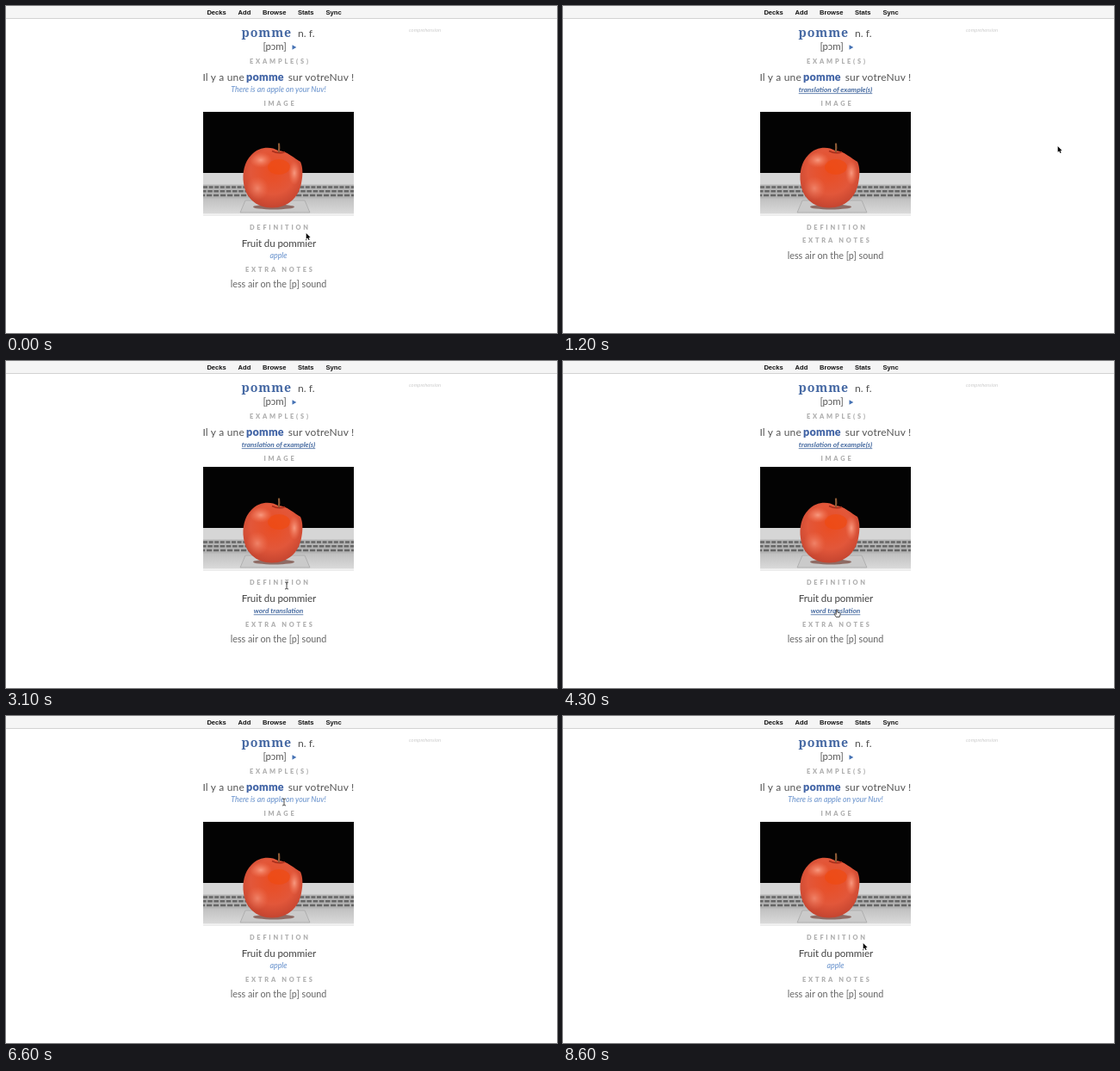
An HTML page for the animation above (8.7 s loop, 640 px wide and 380 px high).

```html
<!DOCTYPE html>
<html lang="fr">
<head>
<meta charset="utf-8">
<title>Vocabulary card</title>
<style>
html, body { margin: 0; width: 100%; height: 100%; overflow: hidden; background: #fff; }
svg { display: block; width: 640px; height: 380px; }
text { font-family: Lato, "Noto Sans", sans-serif; fill: #555; white-space: pre; }
.menu text { font: bold 7.6px "Liberation Sans", sans-serif; fill: #111; text-anchor: middle; }
.head { font-size: 7.4px; font-weight: 900; letter-spacing: 2.8px; fill: #b0b0b0; text-anchor: middle; }
.word { font: bold 14.2px "Noto Serif", serif; letter-spacing: 0.9px; fill: #4568a3; }
.line { font-size: 12px; letter-spacing: 0.2px; }
.line .key { font-size: 12.6px; font-weight: 900; fill: #4063a5; }
.small { font-size: 8.8px; font-weight: 500; font-style: italic; text-anchor: middle; fill: #6f97cf; }
.link { font-size: 8.3px; font-weight: 700; fill: #43689f; text-decoration: underline; text-decoration-thickness: 0.7px; }
.tag { font-size: 5.9px; font-style: italic; fill: #ccc; }
</style>
</head>
<body>
<svg viewBox="0 0 640 380">
  <defs>
    <radialGradient id="skin" cx="0.5" cy="0.4" r="0.62">
      <stop offset="0" stop-color="#ea4d22"/>
      <stop offset="0.6" stop-color="#e2573a"/>
      <stop offset="1" stop-color="#c2432f"/>
    </radialGradient>
    <radialGradient id="shine">
      <stop offset="0" stop-color="#fba58c" stop-opacity="0.85"/>
      <stop offset="1" stop-color="#f58062" stop-opacity="0"/>
    </radialGradient>
    <linearGradient id="metal" x2="0" y2="1">
      <stop offset="0" stop-color="#c0c0c0"/>
      <stop offset="1" stop-color="#dedede"/>
    </linearGradient>
    <clipPath id="frame"><path d="M229 123H404V244H229z"/></clipPath>
  </defs>

  <path d="M0 0h640v14H0z" fill="#f5f5f5"/>
  <path d="M0 14.5h640" stroke="#d2d2d2"/>
  <g class="menu">
    <text x="244.6" y="9.6">Decks</text>
    <text x="277" y="9.6">Add</text>
    <text x="311.7" y="9.6">Browse</text>
    <text x="348.2" y="9.6">Stats</text>
    <text x="380.6" y="9.6">Sync</text>
  </g>

  <text class="word" x="273.6" y="35.5">pomme</text>
  <text x="339" y="35.8" font-size="12.2">n. f.</text>
  <text x="298.4" y="50.6" font-size="11.4">[pɔm]</text>
  <path d="M332.5 45.2l4.8 2.8-4.8 2.8z" fill="#4572b4"/>
  <text class="tag" x="468" y="30">comprehension</text>
  <text class="head" x="318.4" y="67">EXAMPLE(S)</text>

  <g id="back">
    <g class="line">
      <text x="228.4" y="87">Il y a une</text>
      <text class="key" x="279" y="87">pomme</text>
      <text x="327.7" y="87">sur votre</text>
      <text x="375.5" y="87">Nuv !</text>
    </g>
    <text class="small link" id="exLink" x="316.5" y="100.3">translation of example(s)</text>
    <text class="small" id="exText" x="316.5" y="100.3">There is an apple on your Nuv!</text>
    <text class="head" x="318.4" y="115.6">IMAGE</text>

    <g clip-path="url(#frame)">
      <path d="M229 123H404V244H229z" fill="#030303"/>
      <path d="M229 194H404V244H229z" fill="#d6d6d6"/>
      <path d="M229 207.5H404V224H229z" fill="#b4b4b4"/>
      <g fill="none" stroke="#666" stroke-width="2.6">
        <path d="M229 210.5H404" stroke-dasharray="5 1.6"/>
        <path d="M227 215.3H404" stroke-dasharray="5.6 1.6"/>
        <path d="M225 220H404" stroke-dasharray="6.2 1.8"/>
      </g>
      <path d="M229 223.5H404V244H229z" fill="url(#metal)"/>
      <path d="M278 226h69l6 14h-81z" fill="#cacaca" stroke="#a4a4a4" stroke-width="0.7"/>
      <path d="M229 242.5H404" stroke="#f2f2f2" stroke-width="2.6"/>
      <ellipse cx="311" cy="233.5" rx="24" ry="3" fill="#75443a" opacity="0.7"/>
      <path d="M316 168C308 163 294 163 285 173C277 181 274 194 276 206C278 222 290 234.5 309 234.5C328 234.5 340 222 343 206C345 197 345 187 342 181C336 178 326 168 316 168Z" fill="url(#skin)"/>
      <ellipse cx="317" cy="187" rx="13" ry="9" fill="#f04a10" opacity="0.65"/>
      <ellipse cx="296" cy="179" rx="13" ry="9" fill="url(#shine)"/>
      <ellipse cx="335" cy="194" rx="7" ry="14" fill="url(#shine)"/>
      <ellipse cx="292" cy="212" rx="13" ry="14" fill="url(#shine)" opacity="0.65"/>
      <path d="M309 168.5q8 4 15 1" fill="none" stroke="#a52d1b" stroke-width="1.4"/>
      <path d="M316.8 170q.8-5 .2-10.5" fill="none" stroke="#8b5a36" stroke-width="2.2"/>
    </g>

    <text class="head" x="318.4" y="260">DEFINITION</text>
    <g id="def">
      <text x="273.8" y="279.6" font-size="11.6" letter-spacing="-0.1" style="fill:#444">Fruit du pommier</text>
      <text class="small link" id="wordLink" x="316.5" y="293.4">word translation</text>
      <text class="small" id="wordText" x="316.5" y="293.4">apple</text>
    </g>
    <g id="notes">
      <text class="head" x="318.4" y="308.5">EXTRA NOTES</text>
      <text x="316.5" y="327" font-size="10.8" text-anchor="middle" style="fill:#666">less air on the [p] sound</text>
    </g>
  </g>

  <g id="cursor">
    <path id="arrow" d="M-.3 0V6.8L1.4 5.4L2.5 7.9L3.6 7.4L2.6 5H4.6Z" fill="#000" stroke="#fff" stroke-width="0.6" paint-order="stroke"/>
    <path id="beam" d="M-2-4Q0-4 0-3Q0-4 2-4M0-3V3M-2 4Q0 4 0 3Q0 4 2 4" fill="none" stroke="#333" stroke-width="0.9"/>
    <path id="hand" d="M-.7 0Q0-.8.7 0V3L3.6 3.8Q4.4 4.2 4 5.6L3.2 8.5H-.8L-3 5Q-2.6 4-.7 5.4Z" fill="#fff" stroke="#111" stroke-width="0.7"/>
  </g>
</svg>
<script>
const LOOP = 8700, STEP = 100;
const $ = id => document.getElementById(id);

// time, x, y, pointer shape
const path = [
  [0, 349, 264, "arrow"],
  [100, 585, 161, "arrow"],
  [400, 585, 161, "arrow"],
  [500, 576, 163, "arrow"],
  [900, 575, 163, "arrow"],
  [1800, 575, 163, "arrow"],
  [2700, 421, 264, "arrow"],
  [3000, 330, 261, "beam"],
  [3100, 326, 261, "beam"],
  [3700, 326, 263, "beam"],
  [4300, 318, 289, "hand"],
  [4800, 318, 289, "hand"],
  [5000, 345, 282, "beam"],
  [5200, 368, 273, "beam"],
  [5300, 368, 273, "beam"],
  [5400, 380, 269, "beam"],
  [5600, 440, 200, "arrow"],
  [5900, 331, 97, "hand"],
  [6200, 325, 98, "beam"],
  [6600, 323, 100, "beam"],
  [6700, 323, 102, "arrow"],
  [7100, 338, 228, "arrow"],
  [7600, 349, 264, "arrow"],
  [LOOP, 349, 264, "arrow"]
];

const show = (id, on) => { $(id).style.display = on ? "" : "none"; };

function pointer(t) {
  let i = path.length - 2;
  while (path[i][0] > t) i--;
  const [t0, x0, y0, shape] = path[i], [t1, x1, y1] = path[i + 1];
  const k = (t - t0) / (t1 - t0);
  const e = k * k * (3 - 2 * k);
  return { x: x0 + (x1 - x0) * e, y: y0 + (y1 - y0) * e, shape };
}

function draw(t) {
  const since = at => t < 100 || t >= at;
  const def = since(2900), word = since(4700), ex = since(6000);
  show("back", since(1100));
  show("def", def);
  show("wordLink", !word);
  show("wordText", word);
  show("exLink", !ex);
  show("exText", ex);
  $("notes").setAttribute("transform", `translate(0 ${def ? 0 : -33.3})`);

  const p = pointer(t);
  $("cursor").setAttribute("transform", `translate(${p.x} ${p.y})`);
  for (const s of ["arrow", "beam", "hand"]) show(s, s === p.shape);
}

function tick() {
  draw(Math.floor(performance.now() % LOOP / STEP) * STEP);
  requestAnimationFrame(tick);
}
tick();
</script>
</body>
</html>
```
